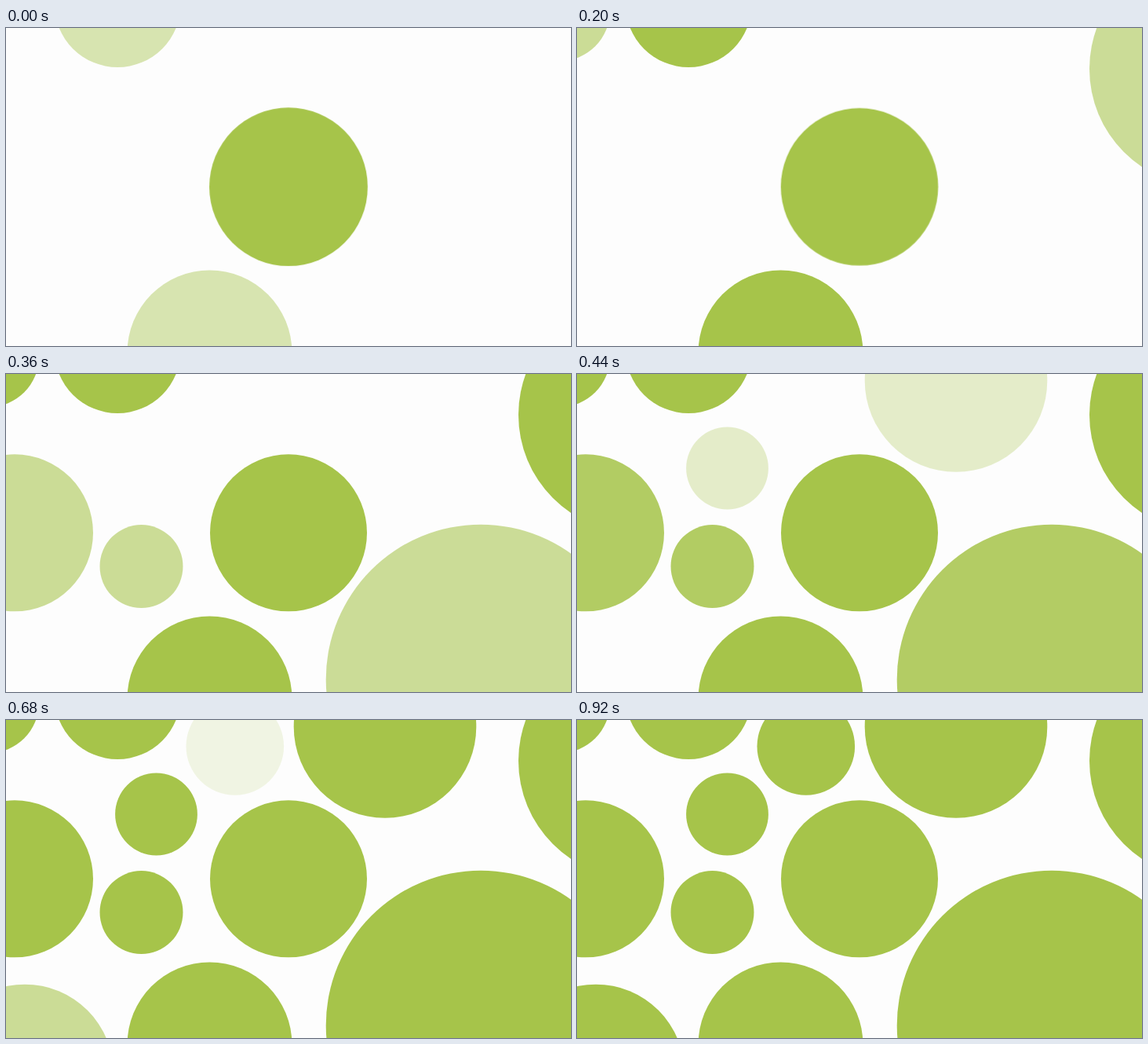
An HTML page that plays this animation: 720x405 px, repeating every 1 s.

```html
<!DOCTYPE html>
<html lang="en">
<head>
<meta charset="utf-8">
<title>Green circles</title>
<style>
  html, body { margin: 0; width: 100%; height: 100%; overflow: hidden; background: #fdfdfd; }
  svg { display: block; width: 100vw; height: 100vh; fill: #a6c44a; }
  g, .hub { animation: 1s -2ms infinite; }

  /* Each group fades in over 280 ms, one seventh every 40 ms. */
  .a { animation-name: fade-a; }
  .b { animation-name: fade-b; }
  .c { animation-name: fade-c; }
  .d { animation-name: fade-d; }
  .e { animation-name: fade-e; }
  .f { animation-name: fade-f; }
  .hub { animation-name: settle; transform-origin: 360px 202.3px; }

  @keyframes fade-a {
    0% { opacity: .42857; animation-timing-function: steps(4); }
    16%, 100% { opacity: 1; }
  }
  @keyframes fade-b {
    0%, 4% { opacity: 0; animation-timing-function: steps(7); }
    32%, 100% { opacity: 1; }
  }
  @keyframes fade-c {
    0%, 20% { opacity: 0; animation-timing-function: steps(7); }
    48%, 100% { opacity: 1; }
  }
  @keyframes fade-d {
    0%, 36% { opacity: 0; animation-timing-function: steps(7); }
    64%, 100% { opacity: 1; }
  }
  @keyframes fade-e {
    0%, 52% { opacity: 0; animation-timing-function: steps(7); }
    80%, 100% { opacity: 1; }
  }
  @keyframes fade-f {
    0%, 64% { opacity: 0; animation-timing-function: steps(7); }
    92%, 100% { opacity: 1; }
  }
  @keyframes settle {
    0% { transform: scale(1.009); animation-timing-function: steps(7); }
    28%, 100% { transform: scale(1); }
  }
</style>
</head>
<body>
<svg viewBox="0 0 720 405" preserveAspectRatio="none">
  <circle class="hub" cx="360" cy="202.3" r="100"/>
  <g class="a">
    <circle cx="142.2" cy="-30.5" r="80.5"/>
    <circle cx="259.5" cy="413.5" r="105"/>
  </g>
  <g class="b">
    <circle cx="-22" cy="-22" r="64"/>
    <circle cx="803" cy="52" r="150"/>
  </g>
  <g class="c">
    <circle cx="11" cy="202.3" r="100"/>
    <circle cx="172.5" cy="245.1" r="53"/>
    <circle cx="605" cy="389" r="197.3"/>
  </g>
  <g class="d">
    <circle cx="483" cy="8.5" r="116.3"/>
    <circle cx="191.5" cy="120" r="52.4"/>
  </g>
  <g class="e">
    <circle cx="24" cy="449.7" r="113"/>
  </g>
  <g class="f">
    <circle cx="291.8" cy="33.5" r="62.3"/>
  </g>
</svg>
</body>
</html>
```
